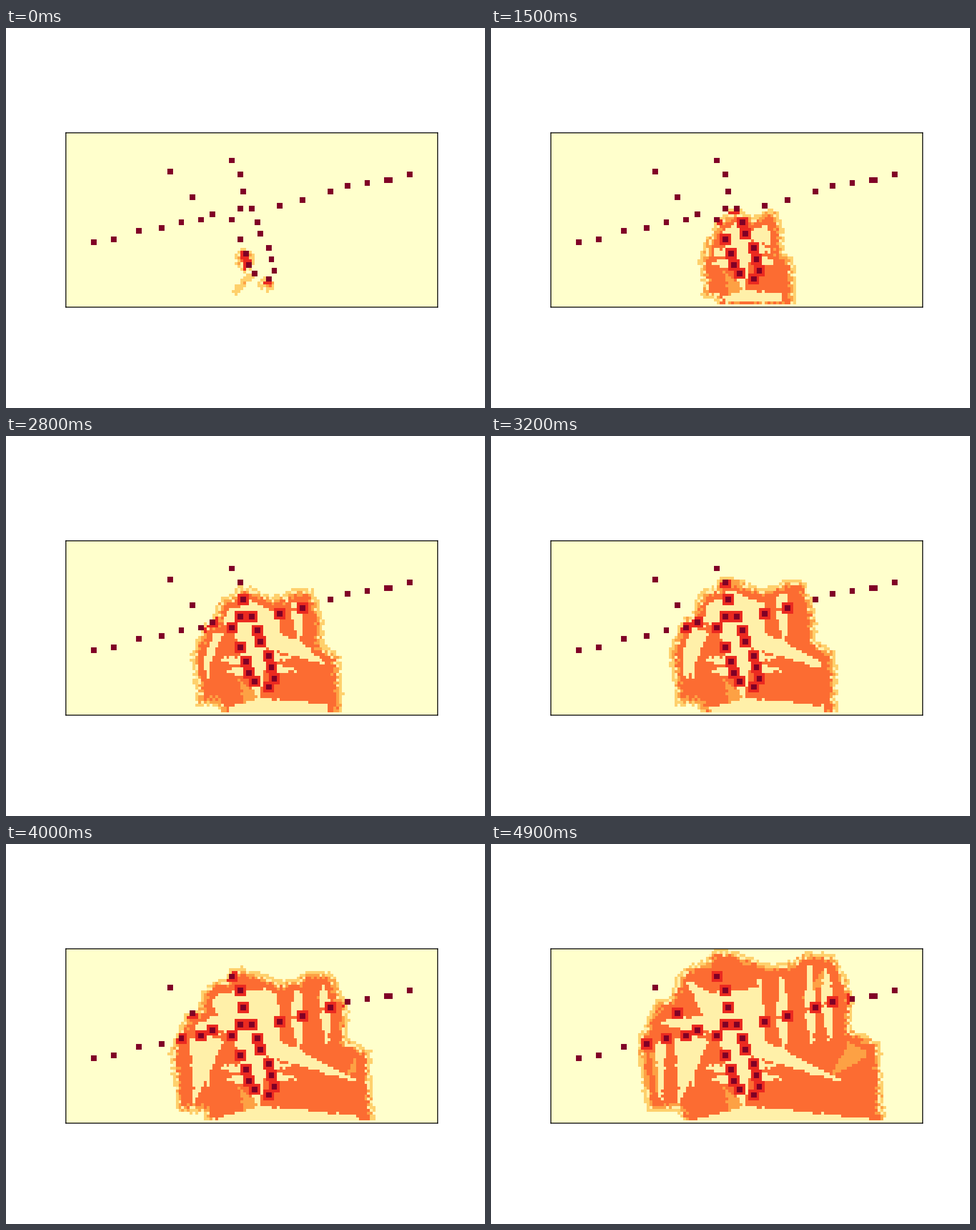
Write a matplotlib script that moves like this. It is 840 px wide and 667 px high and loops after 5000 ms.

```python
import numpy as np
import matplotlib.pyplot as plt
from matplotlib.animation import FuncAnimation
from matplotlib.path import Path

WIDTH, HEIGHT, DPI = 840, 667, 100
COLS, ROWS = 132, 62
FRAMES, INTERVAL = 50, 100
LAST = (FRAMES - 1) * INTERVAL
ORIGIN, CELL = np.array([105, 184]), 651 / COLS

PALE, LIGHT, AMBER, ORANGE, RED, DARK = 0.1, 0.28, 0.43, 0.565, 0.71, 1.0

gx, gy = np.meshgrid(np.arange(COLS) + 0.5, np.arange(ROWS) + 0.5)
cells = np.column_stack([gx.ravel(), gy.ravel()])
rng = np.random.default_rng(7)
jitter = rng.uniform(-0.5, 0.5, (ROWS, COLS))
grain = rng.random((ROWS, COLS))

# Food, as the lower right cell of the middle of each square
TREE = [(59, 10), (62, 15), (63, 21), (62, 27), (66, 27), (68, 32), (69, 36),
        (72, 41), (73, 45), (74, 49), (72, 52), (67, 50), (65, 47), (64, 43),
        (62, 38), (59, 31), (45, 23), (37, 14)]
LEFT_WING = [(10, 39), (17, 38), (26, 35), (34, 34), (41, 32), (48, 31),
             (52, 29), (59, 31)]
RIGHT_WING = [(76, 26), (84, 24), (94, 21), (100, 19), (107, 18), (114, 17),
              (115, 17), (122, 15)]

# Final outline of the colony, in pixels; it grows out of ROOT
ROOT = np.array([435, 485])
OUTLINE = np.array([
    (254, 350), (270, 315), (290, 275), (315, 270), (324, 232), (345, 213),
    (374, 207), (387, 186), (418, 186), (490, 212), (525, 207), (545, 191),
    (603, 194), (620, 230), (634, 270), (632, 325), (682, 350), (691, 500),
    (345, 500), (325, 470), (273, 470)])


def to_cells(point):
    return (np.asarray(point, float) - ORIGIN) / CELL


def project(a, b):
    """Position along a-b (0 to 1 between the ends) for every cell."""
    ab = np.subtract(b, a)
    return ((cells - a) @ ab / (ab @ ab)).reshape(ROWS, COLS)


def segment_distance(a, b):
    s = np.clip(project(a, b), 0, 1)
    return np.hypot(gx - a[0] - s * (b[0] - a[0]),
                    gy - a[1] - s * (b[1] - a[1]))


def depth(poly):
    """Signed distance in cells, positive inside."""
    edge = np.min([segment_distance(a, b)
                   for a, b in zip(poly, np.roll(poly, -1, axis=0))], axis=0)
    inside = Path(poly).contains_points(cells).reshape(ROWS, COLS)
    return np.where(inside, edge, -edge)


def blob(a, b, radius):
    return radius - segment_distance(to_cells(a), to_cells(b))


seed_depth = np.max([blob((417, 402), (419, 414), 3),
                     blob((452, 448), (462, 452), 2),
                     blob((404, 461), (428, 436), 1.2)], axis=0)


def colony_depth(time):
    u = max(time, 0) / LAST
    scale = np.array([0.2 + 0.8 * u ** 1.2, 0.315 + 0.685 * u ** 0.85])
    grown = depth(to_cells(ROOT + (OUTLINE - ROOT) * scale))
    blend = np.clip(time / 800, 0, 1)
    return seed_depth * (1 - blend) + grown * blend


def spike(base, tip, half_width):
    """Tapered wedge from a flat base to a point, in cells."""
    s = project(base, tip)
    near = segment_distance(base, tip) + 0.5 * jitter
    return (s >= 0) & (s <= 1) & (near < half_width * (1 - s) + 0.3)


def wedge(base, tip, half_width):
    return spike(to_cells(base), to_cells(tip), half_width / CELL)


pale = np.any([
    wedge((424, 258), (443, 465), 52),
    wedge((450, 352), (614, 416), 17),
    wedge((395, 295), (340, 237), 22),
    wedge((400, 320), (292, 312), 20),
    wedge((358, 340), (328, 455), 22),
    wedge((440, 478), (692, 486), 17),
    wedge((440, 478), (345, 488), 13),
], axis=0)

# Spikes leave the lower tree sideways and the wings up and down
for c, r in TREE:
    if 40 < r < 48:
        side = 1 if c > 68 else -1
        pale |= spike((c, r), (c + 9 * side, r + side), 1.5)
for c, r in RIGHT_WING:
    pale |= spike((c - 2, r), (c - 2, r - 16), 2)
    pale |= spike((c - 2, r), (c - 1, r + 14), 2)
for c, r in LEFT_WING[:-1]:
    pale |= spike((c - 2, r), (c - 2, r + 22), 2)

amber = (wedge((655, 348), (595, 408), 24) | wedge((600, 220), (545, 272), 10)
         | wedge((282, 365), (285, 500), 12) | wedge((434, 470), (408, 425), 14))

vein = np.min([segment_distance(a, b) for wing in (LEFT_WING, RIGHT_WING)
               for a, b in zip(wing, wing[1:])], axis=0) < 0.6


def squares(reach):
    mask = np.zeros((ROWS, COLS), bool)
    for c, r in TREE + LEFT_WING + RIGHT_WING:
        mask[r - reach:r + reach, c - reach:c + reach] = True
    return mask


food, halo = squares(1), squares(2)


def field(time):
    body = colony_depth(time)
    settled = (colony_depth(time - 300) > 2.5) & (time > 500)
    d = body + jitter
    rim = np.where(grain < 0.55, AMBER, PALE)
    inner_rim = np.where(grain < 0.4, AMBER, ORANGE)
    grid = np.select([d < 0, d < 1, d < 2, d < 3],
                     [0, LIGHT, rim, inner_rim], ORANGE)
    grid[amber & settled] = AMBER
    grid[pale & settled] = PALE
    grid[vein & settled] = ORANGE
    grid[halo & (body > 1)] = RED
    grid[-1] = 0
    grid[food] = DARK
    return grid


fig, ax = plt.subplots(figsize=(WIDTH / DPI, HEIGHT / DPI), dpi=DPI)
fig.subplots_adjust(left=0.125, right=0.9006, bottom=0.11, top=0.88)
image = ax.imshow(field(0), cmap="YlOrRd", vmin=0, vmax=1,
                  interpolation="nearest")
ax.set_xticks([])
ax.set_yticks([])
for spine in ax.spines.values():
    spine.set_linewidth(1.1)


def update(frame):
    image.set_data(field(frame * INTERVAL))
    return [image]


anim = FuncAnimation(fig, update, frames=FRAMES, interval=INTERVAL,
                     repeat=True, repeat_delay=0)
plt.show()
```
